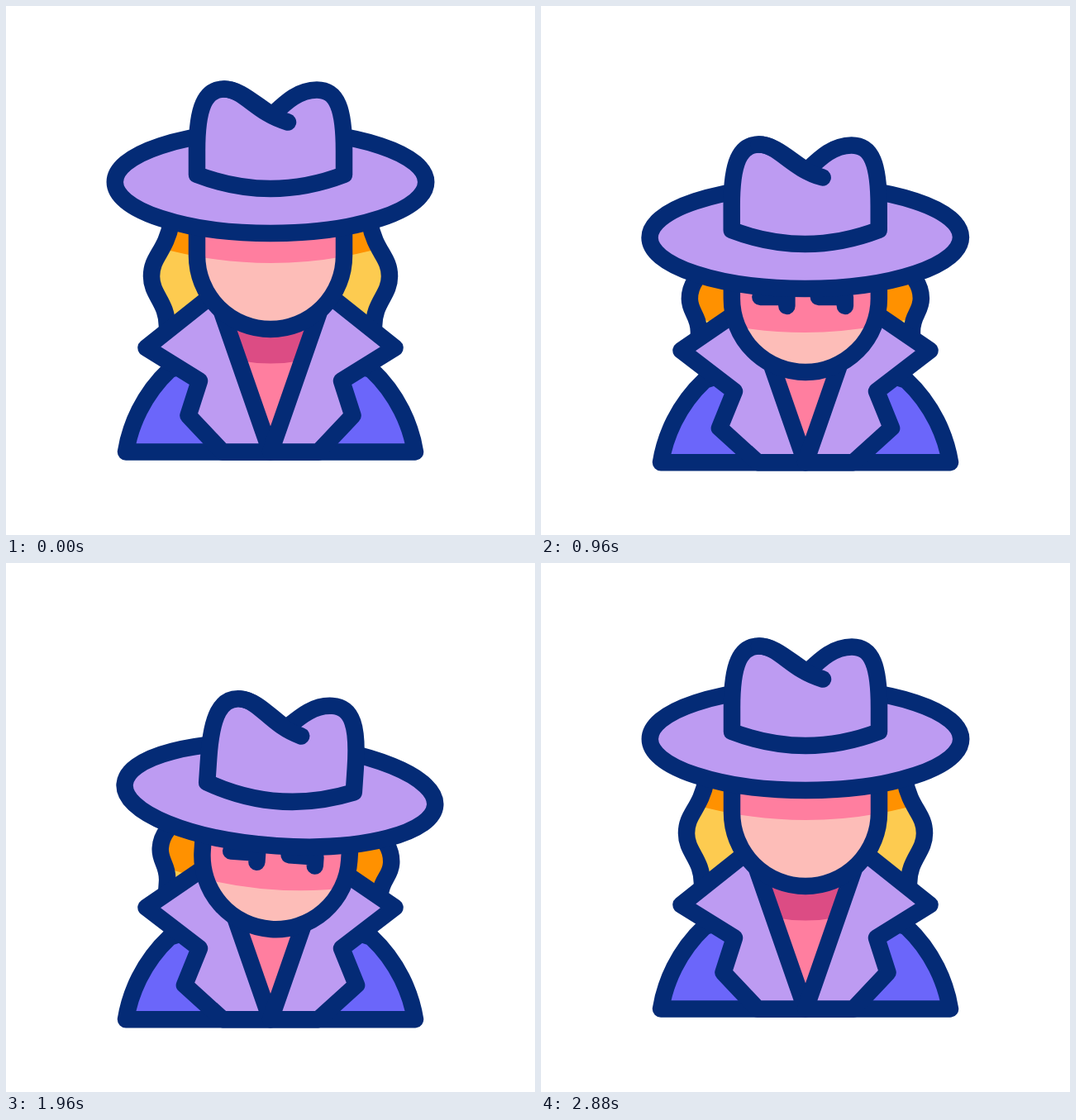
An HTML page that plays this animation: 640x640 px, repeating every 3 s.

```html
<!DOCTYPE html>
<html lang="en">
<head>
<meta charset="utf-8">
<title>Incognito</title>
<style>
  html, body { margin: 0; height: 100%; overflow: hidden; background: #fff; }
  svg { display: block; width: 100%; height: 100%; }
  .line { stroke: #042b76; stroke-width: 20.5; stroke-linecap: round; stroke-linejoin: round; }
</style>
</head>
<body>
<svg viewBox="0 0 640 640" fill="none">
  <defs>
    <path id="shadow" d="M150 100V282.4L180 291Q320 331 460 291L490 282.4V100Z"/>
    <path id="faceShape" d="M231 250V302A89 89 0 0 0 409 302V250"/>
    <clipPath id="hairClip"><path id="hairClipShape"/></clipPath>
    <clipPath id="faceClip"><use href="#faceShape"/></clipPath>
  </defs>

  <g class="head">
    <path id="hairFill" fill="#fdcb50"/>
    <g clip-path="url(#hairClip)"><use id="hairShadow" href="#shadow" fill="#ff9100"/></g>
    <path id="hairLine" class="line"/>
  </g>

  <g id="coat">
    <path class="line" fill="#6b66fa" d="M145 539.5C150 508 166 470 198 440L320 400L442 440C474 470 490 508 495 539.5Z"/>
    <path fill="#ff7e9f" d="M253 347H387L320 539Z"/>
    <path fill="#dc4c84" d="M253 347H387L358 429Q320 436 282 429Z"/>
    <path id="lapel" class="line" fill="#bd9bf2"/>
    <use href="#lapel" transform="matrix(-1 0 0 1 640 0)"/>
  </g>

  <g class="head">
    <g id="face">
      <use href="#faceShape" fill="#fdbdb8"/>
      <g clip-path="url(#faceClip)"><use id="faceShadow" href="#shadow" fill="#ff7e9f"/></g>
      <use href="#faceShape" class="line"/>
    </g>
    <path id="eyes" class="line" d="M265.5 252H297.5V263M336 252H368V263"/>
    <g id="hat" class="line" fill="#bd9bf2">
      <ellipse cx="320" cy="213" rx="188.2" ry="62"/>
      <path d="M231 204V175C231 122 241 100.5 264 100.5C283 100.5 300 118 322 132C337 118 353 101.5 376 101.5C401 101.5 409 125 409 175V204Q320 238 231 204Z"/>
      <path fill="none" d="M264 100.5C288 100.5 303 130 341 140.5"/>
    </g>
  </g>
</svg>

<script>
const LOOP = 3000, STEP = 40;
const $ = id => document.getElementById(id);
const heads = document.querySelectorAll('.head');

const smooth = u => u * u * (3 - 2 * u);

// Cubic bezier (.33, 0, .4, 1), solved by bisection
function settle(u) {
  let lo = 0, hi = 1, s;
  for (let i = 0; i < 24; i++) {
    s = (lo + hi) / 2;
    const x = .99 * (1 - s) ** 2 * s + 1.2 * (1 - s) * s * s + s ** 3;
    if (x < u) lo = s; else hi = s;
  }
  return smooth(s);
}

// Keys are [time, value, easing towards this key]
function track(t, keys) {
  let [t0, v0] = keys[0];
  for (const [t1, v1, ease = smooth] of keys) {
    if (t < t1) return t <= t0 ? v0 : v0 + (v1 - v0) * ease((t - t0) / (t1 - t0));
    [t0, v0] = [t1, v1];
  }
  return v0;
}

const LIFT = [[40, 0], [340, -24.5], [900, 0, settle]];
const DUCK = [[340, 0], [900, 1, settle], [2221, 1], [2850, 0]];
const PEEK = [[340, 0], [970, 1, settle], [2240, 1], [2850, 0]];
const COAT = [[40, 0], [340, -11], [790, 12.7, settle], [2180, 12.7], [2690, 0]];
const TILT = [[930, 0], [1490, -9.7], [1555, -9.7], [2225, 11], [2260, 11], [2830, 0]];

const HAIR_LONG = [[200, 262], [193, 298], [176, 303], [176, 327], [176, 350], [195, 358], [195, 388], [195, 408]];
const HAIR_SHORT = [[206, 314], [190, 324], [180, 338], [180, 354], [180, 370], [191, 374], [191, 394], [191, 408]];

const mirror = points => points.map(([x, y]) => [640 - x, y]);
const strand = p => `${p[0]}C${p.slice(1, 7).join(' ')}L${p[7]}`;
const strandUp = p => `${p[7]}L${p[6]}C${p.slice(0, 6).reverse().join(' ')}`;
const shift = (id, y) => $(id).setAttribute('transform', `translate(0 ${y})`);

function drawHair(duck) {
  const left = HAIR_LONG.map(([x, y], i) => [
    x + (HAIR_SHORT[i][0] - x) * duck,
    y + (HAIR_SHORT[i][1] - y) * duck
  ]);
  const right = mirror(left);
  const area = `M${strand(left)}L${strandUp(right)}Z`;
  $('hairFill').setAttribute('d', area);
  $('hairClipShape').setAttribute('d', area);
  $('hairLine').setAttribute('d', `M${strand(left)}M${strand(right)}`);
}

function draw(t) {
  const duck = track(t, DUCK);
  const pose = `rotate(${track(t, TILT)} 320 450) translate(0 ${track(t, LIFT)})`;
  heads.forEach(head => head.setAttribute('transform', pose));

  drawHair(duck);
  shift('hairShadow', 84 * duck);
  shift('face', 52 * duck);
  shift('faceShadow', 32 * duck);
  shift('eyes', 100 * track(t, PEEK));
  shift('hat', 67 * duck);
  shift('coat', track(t, COAT));
  $('lapel').setAttribute('d',
    `M169.5 ${413.5 - 9.5 * duck}L234 453.5L${220.5 - 4.5 * duck} ${495.5 + 2.3 * duck}L262 539.5H320L253 347Z`);
}

const start = performance.now();
function frame() {
  const t = (performance.now() - start) % LOOP;
  draw(Math.floor(t / STEP) * STEP);
  requestAnimationFrame(frame);
}
frame();
</script>
</body>
</html>
```
